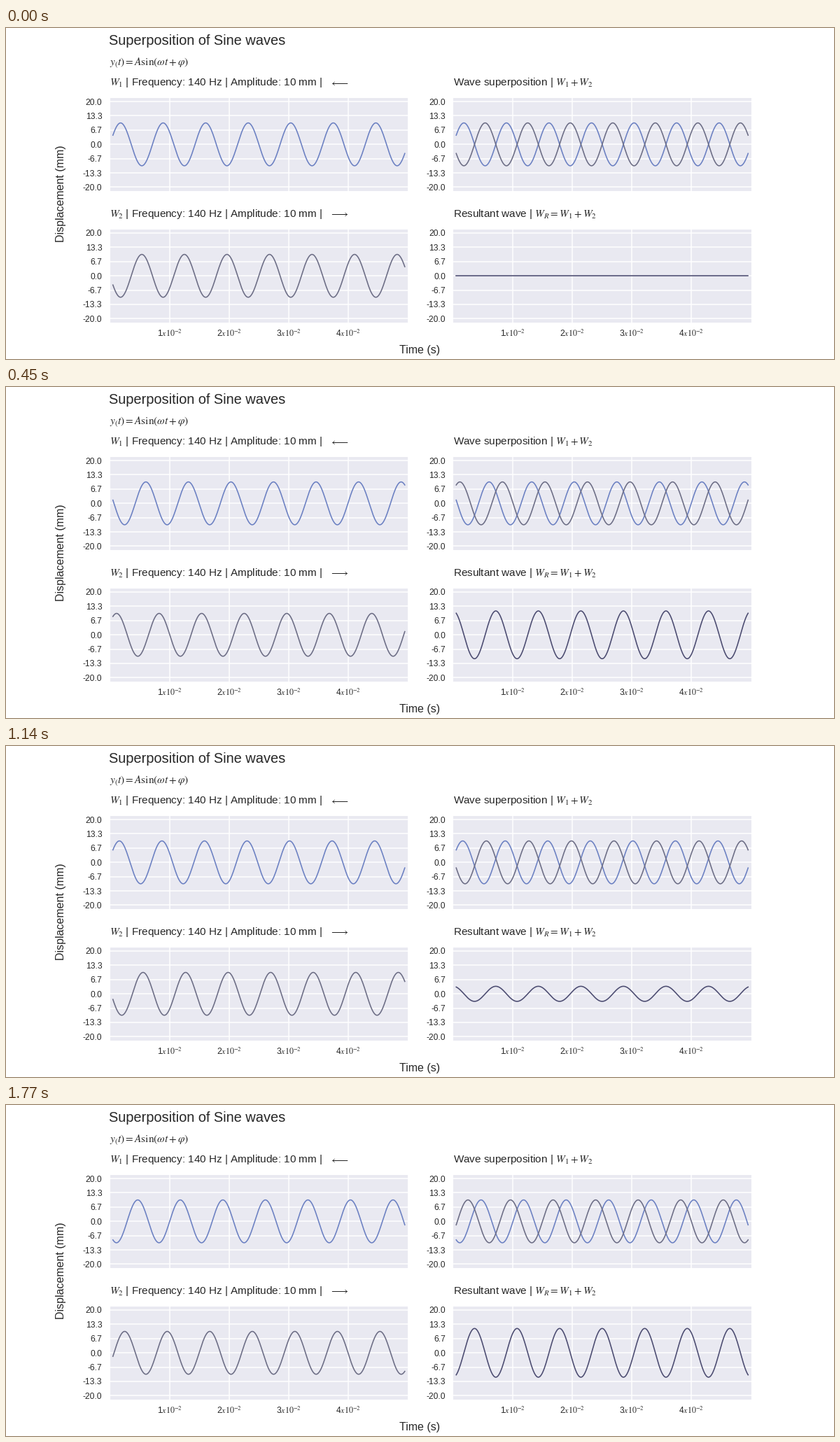
Recreate the animation shown at these times as a matplotlib script. Size 1183 by 473 pixels, loop 1.8 s.

```python
import numpy as np
import matplotlib.pyplot as plt
from matplotlib.animation import FuncAnimation

W, H, DPI = 1183, 473, 128
FRAMES, INTERVAL = 60, 30
FREQ, AMP = 140, 10
STEP = 0.17  # phase advance per frame, radians

INK, PANEL = "#262626", "#E9E9F1"
BLUE, GREY, DARK = "#6B80C2", "#6C6D85", "#4B4B70"

plt.rcParams.update({
    "font.family": "Liberation Sans",
    "mathtext.fontset": "stix",
    "text.color": INK,
})


def pt(px):
    return px * 72 / DPI


fig = plt.figure(figsize=(W / DPI, H / DPI), dpi=DPI, facecolor="white")


def label(x, y, text, size, **kw):
    """Place text with its baseline at pixel (x, y), y measured downwards."""
    kw = {"ha": "left", "va": "baseline", **kw}
    fig.text(x / W, 1 - y / H, text, fontsize=pt(size), **kw)


def panel(left, top, show_time):
    width, height = 425.5, 133.1
    ax = fig.add_axes([left / W, 1 - (top + height) / H, width / W, height / H],
                      facecolor=PANEL)
    ax.set(xlim=(0, 0.05), ylim=(-21.75, 21.75))
    ax.set_axisbelow(True)
    ax.spines[:].set_visible(False)
    ax.grid(color="white", linewidth=pt(1.5), linestyle="-")
    ticks = np.linspace(-20, 20, 7)
    ax.set_yticks(ticks, [f"{v:.1f}" if abs(v) > 1e-9 else "0.0" for v in ticks])
    ax.set_xticks([0.01, 0.02, 0.03, 0.04], [])
    ax.tick_params(length=0, pad=pt(11), labelsize=pt(12), labelcolor=INK)
    if show_time:
        for n in range(1, 5):
            label(left + width * n / 5, 441.3, f"{n}$x10^{{-2}}$", 12, ha="center")
    return ax


def curve(ax, color):
    return ax.plot([], [], color=color, linewidth=pt(1.6))[0]


LEFT, RIGHT, TOP, BOTTOM = 148.5, 639, 99.7, 287.6
ax1 = panel(LEFT, TOP, False)
ax2 = panel(LEFT, BOTTOM, True)
ax_both = panel(RIGHT, TOP, False)
ax_sum = panel(RIGHT, BOTTOM, True)

label(147.3, 24, "Superposition of Sine waves", 20)
label(LEFT, 53, r"$y_(t) = A\sin(\omega t + \varphi)$", 15.3)

info = f"| Frequency: {FREQ} Hz | Amplitude: {AMP} mm |"
for y, name, arrow in [(82.3, "W_1", "longleftarrow"),
                       (269.8, "W_2", "longrightarrow")]:
    label(LEFT, y, f"${name}$ {info}", 15.3)
    label(461.6, y, rf"$\{arrow}$", 15.3)
label(RIGHT, 82.3, "Wave superposition | $W_1 + W_2$", 15.3)
label(RIGHT, 269.8, "Resultant wave | $W_R = W_1 + W_2$", 15.3)

label(591.5, 465, "Time (s)", 16, ha="center")
label(82.5, 236.5, "Displacement (mm)", 16, ha="center",
      rotation=90, rotation_mode="anchor")

t = np.linspace(0.0005, 0.0495, 600)
wave1 = [curve(ax1, BLUE), curve(ax_both, BLUE)]
wave2 = [curve(ax2, GREY), curve(ax_both, GREY)]
result = curve(ax_sum, DARK)


def update(frame):
    phase = STEP * frame
    angle = 2 * np.pi * FREQ * t
    y1 = AMP * np.sin(angle + phase)
    y2 = AMP * np.sin(angle - phase + np.pi)
    for line in wave1:
        line.set_data(t, y1)
    for line in wave2:
        line.set_data(t, y2)
    result.set_data(t, y1 + y2)
    return [*wave1, *wave2, result]


anim = FuncAnimation(fig, update, frames=FRAMES, interval=INTERVAL,
                     repeat=True, repeat_delay=0, blit=False)
plt.show()
```
